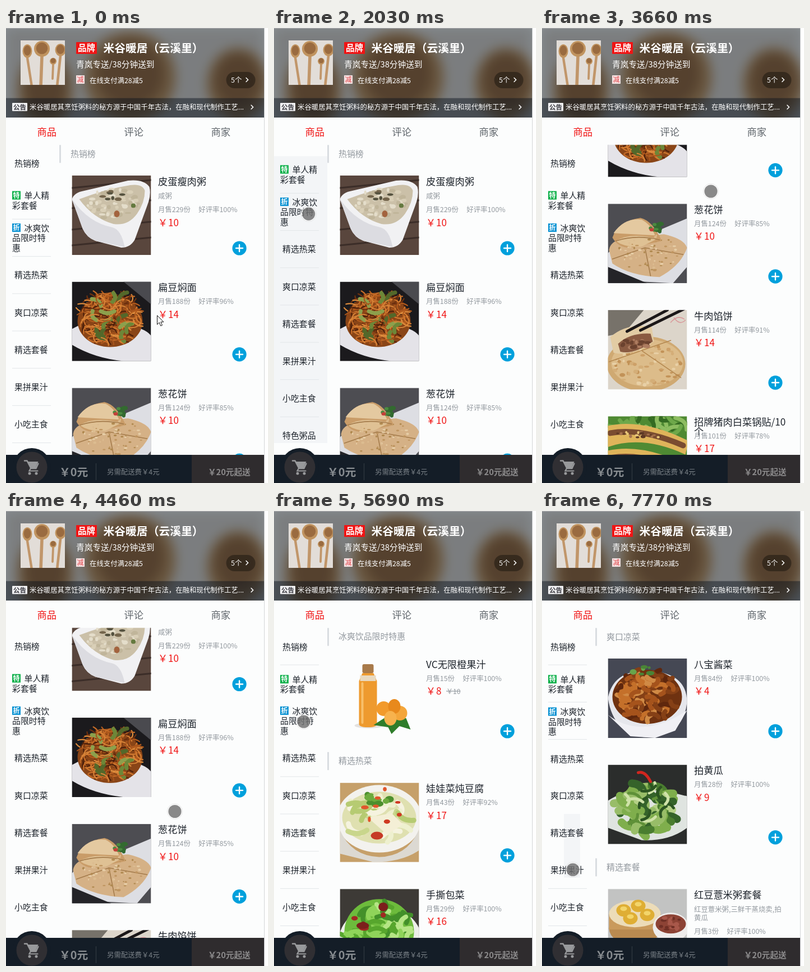
Recreate the animation shown at these times as an HTML page. Size 467 by 808 pixels, loop 8000 ms.

```html
<!DOCTYPE html>
<html lang="zh-CN">
<head>
<meta charset="utf-8">
<style>
html, body { margin: 0; width: 100%; height: 100%; overflow: hidden; background: #fff; }
svg { display: block; }
text { font-family: "Noto Sans CJK SC", "Noto Sans CJK", "Noto Sans SC", sans-serif; white-space: pre; }
.soft { filter: blur(10px); }
</style>
</head>
<body>
<svg id="stage" width="467" height="808" viewBox="0 0 467 808"></svg>
<script>
const LOOP = 8000, TOP = 207.5, PITCH = 188.6, ROW = 66.2;
const RED = '#f01414', GREY = '#93999f', INK = '#1d232b', PANEL = '#f3f5f7', PAGE = '#fcfdfd';

let seed = 7;
const rnd = () => (seed = (seed * 16807) % 2147483647) / 2147483647;
const pick = list => list[Math.floor(rnd() * list.length)];

const rect = (x, y, w, h, fill, more = '') =>
  `<rect x="${x}" y="${y}" width="${w}" height="${h}" fill="${fill}" ${more}/>`;
const oval = (x, y, rx, ry, fill, more = '') =>
  `<ellipse cx="${x}" cy="${y}" rx="${rx}" ry="${ry}" fill="${fill}" ${more}/>`;
const path = (d, fill, more = '') => `<path d="${d}" fill="${fill}" ${more}/>`;
const line = (d, color, w, more = '') =>
  path(d, 'none', `stroke="${color}" stroke-width="${w}" stroke-linecap="round" ${more}`);
// y is the optical middle of the characters
const text = (x, y, size, fill, str, more = '') =>
  `<text x="${x}" y="${(y + size * 0.38).toFixed(1)}" font-size="${size}" fill="${fill}" ${more}>${str}</text>`;

// n random blobs or strokes inside an ellipse
function spread(n, cx, cy, rx, ry, make) {
  let out = '';
  for (let i = 0; i < n; i++) {
    const a = rnd() * 6.283, r = Math.sqrt(rnd());
    out += make(cx + Math.cos(a) * r * rx, cy + Math.sin(a) * r * ry);
  }
  return out;
}
const dots = (colors, size) => (x, y) => oval(x, y, size * (0.5 + rnd()), size * (0.4 + rnd() * 0.6), pick(colors));
const strokes = (colors, w, len) => (x, y) => {
  const a = rnd() * 6.283, dx = Math.cos(a) * len, dy = Math.sin(a) * len * 0.7;
  return line(`M${x - dx} ${y - dy}Q${x + dy} ${y - dx * 0.6} ${x + dx} ${y + dy}`, pick(colors), w);
};

const food = {
  porridge: () => rect(0, 0, 141, 141, '#59463d') +
    [22, 58, 96, 124].map(y => line(`M0 ${y}L141 ${y - 14}`, '#3b2d28', 3)).join('') +
    path('M0 42Q4 30 22 27L100 9Q128 6 138 20Q142 34 134 54L112 114Q104 128 88 128L42 116Q26 110 19 94Z', '#f1f1f3') +
    path('M0 42Q30 84 72 92Q88 96 94 127L42 116Q26 110 19 94Z', '#dcdce1') +
    path('M13 42Q60 24 104 17Q126 14 130 27Q130 48 116 68Q100 90 74 86Q38 76 13 42Z', '#cbc0a8') +
    spread(64, 74, 50, 46, 27, dots(['#e4ddca', '#d9cfb7', '#c0b59a'], 4)) +
    spread(9, 78, 48, 40, 20, dots(['#55523f', '#64793f', '#74654c'], 4.5)) + oval(80, 68, 5, 6, '#a3633e'),
  noodles: () => rect(0, 0, 141, 141, '#1b1a1d') + path('M92 0L141 0L141 40Z', '#4a4a4f') +
    path('M0 84Q40 60 80 74Q130 80 141 96L141 141L92 141Q40 136 0 112Z', '#e4e3e8') +
    oval(68, 70, 58, 46, '#8a4517') + path('M26 52Q60 -8 104 42Z', '#8a4517') +
    spread(150, 68, 64, 54, 46, strokes(['#c56c28', '#dd8b3c', '#6d300f', '#d27a30', '#4f210b', '#b25a1c'], 2.2, 12)) +
    spread(13, 74, 62, 42, 42, strokes(['#6d8738', '#8ca04c', '#53682a'], 7, 12)) +
    spread(26, 68, 68, 50, 40, strokes(['#d98538', '#a9551c'], 2, 12)),
  pancake: () => rect(0, 0, 141, 141, '#4d4d52') + path('M0 88Q10 72 36 70L141 26L141 112L116 141L60 138L0 116Z', '#dddee3') +
    path('M0 112L70 141L0 141Z', '#242428') +
    path('M2 82Q4 66 30 60L100 54Q136 62 141 78Q130 110 92 130Q40 128 8 106Z', '#d5b186') +
    path('M8 60Q18 30 58 25Q80 30 96 66L40 78Q18 78 8 60Z', '#c99c68') +
    path('M10 52Q30 24 60 28Q76 36 84 56Q44 54 10 52Z', '#e4c9a0') + path('M14 66Q40 50 88 62L60 76Q30 78 14 66Z', '#dfc194') +
    line('M14 66Q50 54 92 64M66 78L76 128M66 78L134 90M66 78L8 98', '#a47b4b', 1.6) +
    spread(70, 70, 88, 58, 34, dots(['#bf9560', '#e6cda6', '#b08950', '#dcbc90'], 2.2)) +
    spread(8, 88, 42, 13, 9, dots(['#4b8a40', '#336a30'], 5)) + oval(78, 46, 4, 3, '#c4403a'),
  pie: () => rect(0, 0, 141, 141, '#dcd5ca') + path('M0 0L64 0L30 40L0 46Z', '#77726a') +
    oval(68, 96, 70, 49, '#cfa972') + oval(70, 94, 64, 42, '#dcbc8a') +
    spread(80, 70, 98, 62, 38, dots(['#cda068', '#d4ae78', '#e8d0a6', '#c29257'], 3.4)) +
    line('M2 92L60 72L130 120M60 72L112 54', '#b48850', 1.6) +
    path('M4 48Q34 22 78 30L82 56Q40 84 10 76Z', '#e2cca4') + path('M18 60Q40 40 76 42L80 56Q46 80 22 74Z', '#8a5b42') +
    spread(26, 50, 60, 26, 10, dots(['#6b422f', '#ad7c60'], 4)) +
    line('M34 38L106 0M58 36L136 -2', '#1b1718', 5) +
    line('M112 22q12 -14 24 -6M118 14q10 14 20 4', '#d9999b', 1.5),
  stickers: () => rect(0, 0, 141, 141, '#4f8a33') + spread(24, 70, 14, 70, 18, strokes(['#6ea84a', '#346b22', '#8cbc60'], 7, 18)) +
    [10, 54, 98].map(y => path(`M-4 ${y + 8}Q60 ${y - 8} 144 ${y + 34}L138 ${y + 58}Q60 ${y + 22} -4 ${y + 46}Z`, '#dfb45a') +
      line(`M4 ${y + 20}Q60 ${y + 10} 134 ${y + 42}`, '#7a4c30', 10) +
      spread(20, 64, y + 22, 54, 6, dots(['#a4724e', '#5d3824', '#e8c678'], 3))).join(''),
  juice: () => rect(0, 0, 141, 141, PAGE) + oval(52, 119, 26, 5, '#e4e2e0') +
    path('M40 26L60 26L66 40L66 116Q66 122 50 122Q34 122 34 116L34 40Z', '#ee9a2e') +
    rect(36, 30, 28, 10, '#e8d9c0') + rect(40, 10, 20, 16, '#a87a4a', 'rx="3"') + line('M40 44L40 114', '#f8bf6a', 4) +
    path('M88 100L60 118L86 122L92 134L106 120L126 126L118 106Z', '#2f7d2b') +
    [[78, 89], [107, 97], [97, 85], [90, 106]].map(([x, y], i) => oval(x, y, i < 2 ? 13 : 11, 13, ['#f29a2b', '#f4a63a', '#e8891c', '#f7b24d'][i])).join(''),
  tofu: () => rect(0, 0, 141, 141, '#c6a06a') + oval(70, 64, 76, 60, '#f3f2ee') + path('M0 84Q20 130 70 132Q122 130 141 82L141 120Q110 141 60 141L0 126Z', '#dcd9d2') +
    oval(70, 62, 66, 46, '#dfe0b0') +
    spread(24, 66, 62, 52, 36, strokes(['#eef0cf', '#c9d68c', '#f5f3df', '#b6cb72'], 9, 17)) +
    path('M50 62L92 54L112 74L84 92Z', '#f4efd6') +
    spread(12, 66, 28, 24, 12, dots(['#4c8f2e', '#6cab3d'], 6)) +
    spread(8, 72, 44, 42, 36, dots(['#cf3a22', '#e0562c'], 5)) + oval(66, 94, 11, 7, '#c63a25'),
  cabbage: () => rect(0, 0, 141, 141, '#3d3a36') + oval(72, 92, 74, 62, '#eceee8') + oval(70, 76, 62, 58, '#6dbb3c') +
    spread(70, 70, 80, 56, 50, strokes(['#8fd45a', '#57a62d', '#b5e585', '#43902a'], 8, 14)) +
    spread(7, 56, 46, 36, 28, dots(['#7c1f1c', '#9f2a22'], 8)),
  pickles: () => rect(0, 0, 141, 141, '#454854') + path('M0 70Q10 20 70 22Q141 24 141 78Q134 138 70 140Q10 136 0 70Z', '#e6e7ec') +
    oval(70, 68, 62, 48, '#6f3210') +
    spread(80, 69, 66, 54, 44, strokes(['#a5531c', '#c4702a', '#5f270d', '#854016', '#d08a45'], 8, 9)) +
    spread(6, 64, 20, 22, 8, dots(['#4a8436', '#68a44b'], 5)) + path('M0 100Q60 146 141 92L120 128L84 141L40 138Z', '#f0f0f4'),
  cucumber: () => rect(0, 0, 141, 141, '#2b2d2c') + path('M0 64Q50 30 141 56L141 112Q110 136 60 134L0 112Z', '#dfe4e0') +
    spread(40, 68, 78, 50, 40, strokes(['#7fae4c', '#b4d086', '#4a7d2f', '#98bd68', '#35632a'], 14, 15)) +
    spread(16, 66, 74, 46, 36, strokes(['#cfe2a8', '#2c5522', '#5f9038'], 5, 14)) + line('M54 14Q66 10 76 30', '#d0261f', 5),
  combo: () => rect(0, 0, 141, 141, '#c2c3c2') + oval(48, 70, 46, 30, '#b98a50') + rect(2, 44, 92, 28, '#c99a5c') + oval(48, 44, 46, 24, '#ecdcb8') +
    [[28, 38], [54, 30], [70, 46], [40, 52]].map(([x, y]) => oval(x, y, 13, 11, '#dfae34') + oval(x, y - 3, 6, 4, '#f3d56a')).join('') +
    oval(112, 68, 32, 26, '#eeeceb') + oval(112, 62, 27, 17, '#8d4335') + spread(18, 112, 62, 22, 12, dots(['#a8584a', '#6f2f25'], 4)) +
    oval(66, 128, 50, 28, '#efeeec') + oval(66, 126, 42, 20, '#d8c79a')
};

// title, then rows of: name, picture, sold, rating, price, description, old price
const sections = [
  ['热销榜',
    ['皮蛋瘦肉粥', 'porridge', 229, 100, 10, '咸粥'], ['扁豆焖面', 'noodles', 188, 96, 14],
    ['葱花饼', 'pancake', 124, 85, 10], ['牛肉馅饼', 'pie', 114, 91, 14],
    ['招牌猪肉白菜锅贴/10|个', 'stickers', 101, 78, 17], ['南瓜粥', 'porridge', 91, 100, 9, '甜粥'],
    ['红豆薏米粥', 'tofu', 86, 100, 12, '甜粥'], ['八宝酱菜', 'pickles', 84, 100, 4],
    ['山药糙米粥', 'porridge', 81, 91, 10], ['糊塌子', 'pancake', 80, 93, 10]],
  ['单人精彩套餐', ['红枣山药粥套餐', 'combo', 17, 100, 29]],
  ['冰爽饮品限时特惠', ['VC无限橙果汁', 'juice', 15, 100, 8, '', 10]],
  ['精选热菜', ['娃娃菜炖豆腐', 'tofu', 43, 92, 17], ['手撕包菜', 'cabbage', 29, 100, 16], ['香酥黄金鱼', 'pie', 15, 100, 11]],
  ['爽口凉菜', ['八宝酱菜', 'pickles', 84, 100, 4], ['拍黄瓜', 'cucumber', 28, 100, 9]],
  ['精选套餐', ['红豆薏米粥套餐', 'combo', 3, 100, 37, '红豆薏米粥,三鲜干蒸烧卖,拍|黄瓜']]
];

function dish([name, pic, sold, rate, price, desc = '', old], y) {
  const notes = desc ? desc.split('|') : [];
  const base = y + 35 + (notes.length ? 11 + notes.length * 14.5 : 0);
  return `<svg x="117.5" y="${y}" width="141" height="141">${food[pic]()}</svg>` +
    name.split('|').map((s, i) => text(271, y + 10.3 + i * 17, 17.2, INK, s)).join('') +
    notes.map((s, i) => text(271, y + 36.5 + i * 14.5, 12.4, GREY, s)).join('') +
    text(271, base, 12.4, GREY, `月售${sold}份<tspan dx="14.5">好评率${rate}%</tspan>`) +
    text(271, base + 22.5, 17, RED, `￥<tspan dx="1">${price}</tspan>`) +
    (old ? text(307, base + 23, 12, GREY, '￥' + old, 'text-decoration="line-through"') : '') +
    oval(416, y + 129, 12.6, 12.6, '#00a0dc') +
    line(`M410 ${y + 129}h12M416 ${y + 123}v12`, '#fff', 2.4);
}

const tops = [];
function goods() {
  let y = TOP, out = '';
  for (const [title, ...rows] of sections) {
    tops.push(TOP - y);
    out += rect(95, y, 3, 32, '#d9dde1') + text(115, y + 15.3, 14.9, GREY, title);
    rows.forEach((row, i) => out += dish(row, y + 54.5 + i * PITCH));
    y += 32 + rows.length * PITCH;
  }
  return out;
}

const menu = ['热销榜', '单人精|彩套餐', '冰爽饮|品限时特|惠', '精选热菜', '爽口凉菜', '精选套餐', '果拼果汁', '小吃主食', '特色粥品'];
const tags = { 1: ['特', '#0db14b'], 2: ['折', '#0a93d3'] };
function menuRow(name, i) {
  const mid = TOP + ROW * (i + 0.5) - 0.5, rows = name.split('|'), tag = tags[i];
  const first = mid - (rows.length - 1) * 8.7;
  return '<g class="row">' +
    (tag ? rect(11, first - 8, 15, 15, tag[1]) + text(12.5, first - 0.7, 12, '#fff', tag[0], 'font-weight="700"') : '') +
    rows.map((s, k) => text(tag ? (k ? 11 : 32.5) : 15, first + k * 17.4, 14.9, INK, s)).join('') + '</g>';
}
const rule = (_, i) => rect(11, TOP + ROW * (i + 1) - 1, 69, 1, '#e3e6e9', 'class="rule"');

// wooden spoons: bowl x, y, rx, ry, then the foot of the handle
const spoons = rect(0, 0, 79, 79, '#e2ddd8') +
  [[12, 19, 8.5, 12, 20, 82], [38, 15, 14, 14, 36, 82], [71, 17, 9.5, 11, 65, 82], [58, 37, 6, 6, 57, 68]].map(([x, y, rx, ry, fx, fy]) =>
    line(`M${x} ${y + ry}L${fx} ${fy}`, '#c1966a', rx * 0.22 + 2.5) + oval(x, y, rx, ry, '#c0935f') +
    oval(x, y - 1, rx * 0.74, ry * 0.74, '#9a6b40')).join('');

// the same picture, enlarged, blurred and dimmed, lies behind the header
const header = `<svg width="460" height="159"><g class="soft"><g transform="scale(5.82)">${spoons}</g></g></svg>` +
  rect(0, 0, 460, 159, '#07111b', 'opacity=".47"') +
  rect(0, 124.5, 460, 34.5, '#07111b', 'opacity=".45"') + rect(0, 0, 460, 1, '#a9aaad') +
  `<svg x="26" y="22" width="79" height="79">${spoons}</svg>` +
  rect(125, 25, 37, 21, RED, 'rx="1"') + text(128, 35.5, 15.5, '#fff', '品牌', 'font-weight="700"') +
  text(173.5, 35.5, 19.8, '#fff', '米谷暖居（云溪里）', 'font-weight="700"') +
  text(125, 64.5, 14.7, '#fff', '青岚专送/38分钟送到') +
  rect(125, 84, 15, 15, '#f6e4e4') + text(126.5, 91.5, 12, '#e0474c', '减') +
  text(149, 93.5, 12.4, '#fff', '在线支付满28减5') +
  rect(392.5, 78, 52, 29, '#000', 'rx="14.5" opacity=".36"') + text(401, 92, 12.4, '#fff', '5个') + line('M428 88.5l3.5 3.5l-3.5 3.5', '#fff', 1.5) +
  rect(11, 133, 27, 14.5, '#f1f1f3', 'rx="1"') + text(13, 140.2, 11.5, '#3b3b42', '公告', 'font-weight="700"') +
  text(42, 140.5, 12.4, '#fff', '米谷暖居其烹饪粥料的秘方源于中国千年古法，在融和现代制作工艺...') +
  line('M437 137l3.5 3.5l-3.5 3.5', '#fff', 1.5);

const tabs = rect(0, 159, 460, 48.5, PAGE) + ['商品', '评论', '商家'].map((s, i) => text(55.5 + i * 155, 184.5, 17.3, i ? '#5f656b' : RED, s)).join('');

const footer = rect(0, 758, 460, 50, '#141d27') + rect(331, 758, 129, 50, '#2f2c2e') +
  oval(46, 780, 34, 34, '#141d27') + oval(46, 780, 27.5, 27.5, '#302f33') +
  line('M33 768.5h4.5l7 13.5h9l4-8.5', '#98999b', 2.4) + path('M39 770h18.5l-4.5 11h-9z', '#98999b') +
  line('M44.5 781l-3 5.5h15', '#98999b', 2.2) + oval(42, 791, 2.5, 2.5, '#98999b') + oval(54, 791, 2.5, 2.5, '#98999b') +
  text(95, 788, 19.8, '#888d91', '￥0元', 'font-weight="700"') + rect(160, 773, 1, 30, '#343c45') +
  text(180, 788, 12.4, '#7b8288', '另需配送费￥4元') + text(360, 788, 14.6, '#8c8b8c', '￥20元起送', 'font-weight="700"');

stage.innerHTML = '<defs><clipPath id="view"><rect y="207" width="460" height="551"/></clipPath></defs>' +
  rect(0, 0, 467, 808, PAGE) + '<g clip-path="url(#view)">' +
  `<g id="list">${goods()}</g>` + rect(0, 207, 95, 551, PANEL, 'id="panel"') + rect(0, 0, 0, 0, PANEL, 'id="patch"') +
  `<g id="side">${rect(0, TOP - 1, 95, ROW + 1, PAGE, 'id="current"')}${menu.map(rule).join('')}${menu.map(menuRow).join('')}</g></g>` +
  header + tabs + footer + rect(460, 0, 7, 808, '#fff') + rect(460, 0, 1, 808, '#d3d5d7') +
  `<g id="finger">${oval(0, 0, 13.5, 13.5, '#fff', 'fill-opacity=".6" stroke="#999" stroke-opacity=".3" stroke-width=".8"')}${oval(0, 0, 11.6, 11.6, '#282828', 'opacity=".55"')}</g>` +
  path('M269.5 510.5v16l3.7-3.5l2.6 6l2.7-1.2l-2.6-5.8h5z', '#fff', 'id="arrow" stroke="#111"');

// bursts of change: first, last, count
const beats = [[0, 0, 1], [150, 1090, 7], [1240, 2280, 9], [2430, 3390, 8], [3520, 3660, 2], [3940, 4880, 8],
  [5030, 5180, 2], [5450, 5690, 3], [6250, 6520, 3], [6820, 6820, 1], [7100, 7370, 3], [7650, 7770, 2]]
  .flatMap(([a, b, n]) => Array.from({ length: n }, (_, i) => a + (n > 1 ? (b - a) * i / (n - 1) : 0)));

const fingerKeys = [[150, 323, 602], [1090, 53, 690], [1240, 56, 440], [1360, 61, 328], [1490, 61, 312], [2280, 62, 339],
  [2704, 66, 581], [2850, 67, 585], [3120, 301, 617], [3660, 301, 290], [3800, 301, 290], [4480, 301, 595],
  [4880, 131, 446], [5180, 53, 374], [6120, 53, 374], [6520, 53, 520], [7500, 53, 520], [7770, 55, 637]];
const sideKeys = [[1090, 0], [1240, -60], [1370, -109], [1490, -113], [1900, -46], [2280, -46], [2704, 65.5], [2850, 65.5], [3390, 0]];
const listKeys = [[3120, 0], [3660, -327], [3800, -327], [4480, -22], [5330, -22],
  [5690, tops[2], 1], [6970, tops[2]], [7370, tops[4], 1]];

// linear between keys; a list key ending in 1 eases out
function at(keys, t, col = 1) {
  const i = keys.findIndex(k => k[0] > t);
  if (i < 0) return keys[keys.length - 1][col];
  if (i === 0) return keys[0][col];
  const a = keys[i - 1], b = keys[i];
  let p = (t - a[0]) / (b[0] - a[0]);
  if (keys === listKeys && b[2]) p = p * (2 - p);
  return a[col] + (b[col] - a[col]) * p;
}

const move = (el, x, y) => el.setAttribute('transform', `translate(${x} ${y})`);
const show = (el, on) => el.setAttribute('visibility', on ? 'visible' : 'hidden');
const $ = id => document.getElementById(id);
const [list, panel, patch, side, current, finger, arrow] =
  ['list', 'panel', 'patch', 'side', 'current', 'finger', 'arrow'].map($);
const rules = [...document.querySelectorAll('.rule')], rows = [...document.querySelectorAll('.row')];

// leftover grey blocks in the menu: from, to, x, y, w, h
const patches = [[5030, 5450, 39, 360, 56, 99], [6250, 7100, 37, 404, 30, 134], [7650, 8000, 39, 538, 29, 113]];

function draw(now) {
  const clock = now % LOOP + 15;
  const t = beats.filter(b => b <= clock).pop();
  move(finger, at(fingerKeys, t), at(fingerKeys, t, 2));
  move(list, 0, at(listKeys, t));
  move(side, 0, at(sideKeys, t));
  show(arrow, t < 150);
  show(finger, t >= 150);
  const grey = t >= 1240 && t < 3520;
  show(panel, grey);
  show(current, grey);
  panel.setAttribute('height', t < 2280 ? 530 : 551);
  const block = patches.find(([a, b]) => t >= a && t < b);
  show(patch, block);
  if (block) ['x', 'y', 'width', 'height'].forEach((k, i) => patch.setAttribute(k, block[i + 2]));
  const active = t < 5450 ? 0 : t < 7100 ? 2 : 4;
  const lines = t < 3520 ? '12345678' : t < 5450 ? '' : t < 7100 ? '0345678' : '012678';
  rules.forEach((el, i) => show(el, lines.includes(i)));
  rows.forEach((el, i) => move(el, 0, i < active ? 1.6 : 0));
}

function tick() {
  draw(performance.now());
  requestAnimationFrame(tick);
}
tick();
</script>
</body>
</html>
```
